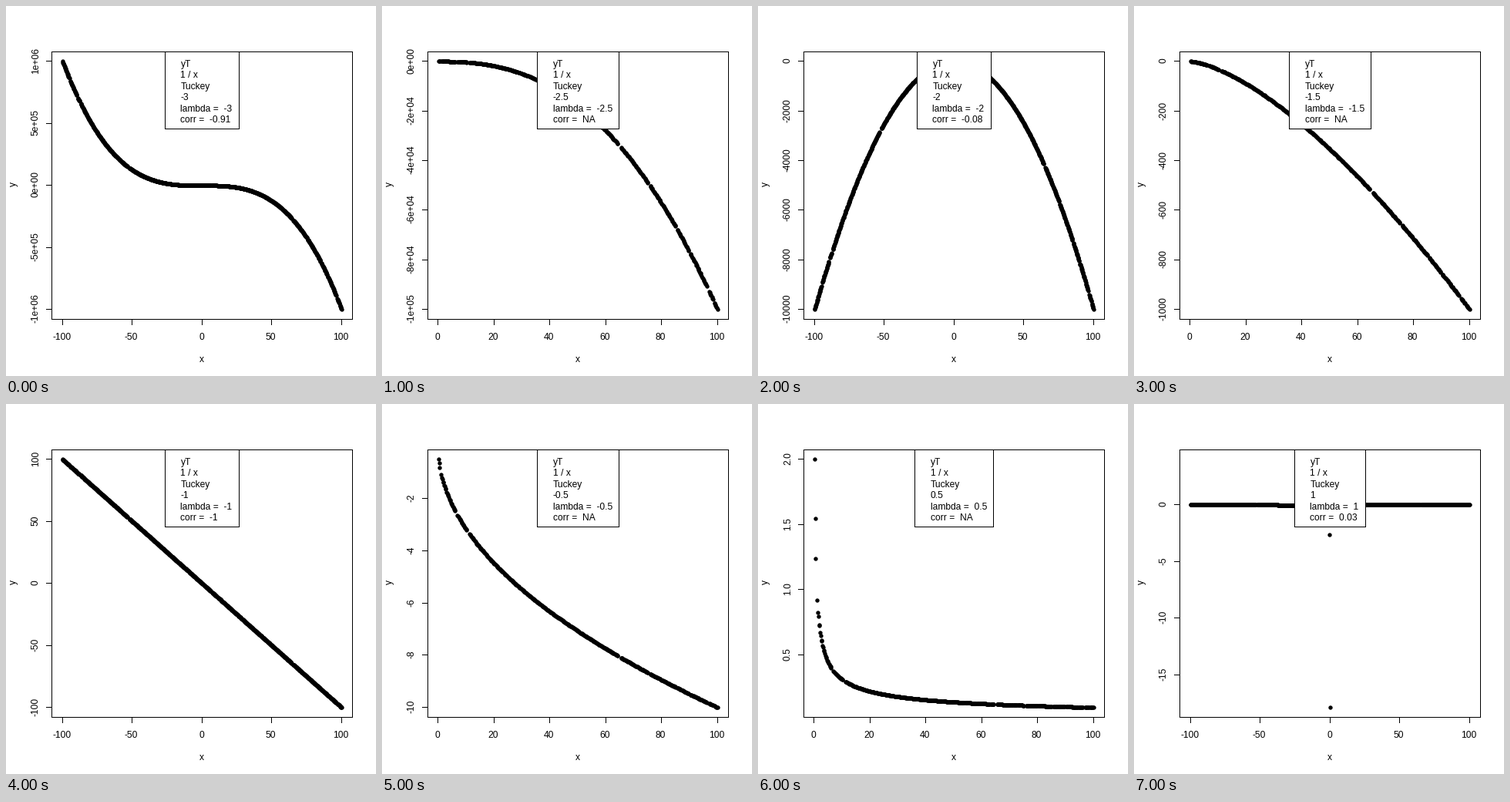
A matplotlib script for the animation above (8 s loop, 480 px wide and 480 px high).

```python
import math

import matplotlib.pyplot as plt
import numpy as np
from matplotlib.animation import FuncAnimation
from matplotlib.markers import MarkerStyle
from matplotlib.patches import Rectangle
from matplotlib.transforms import Affine2D

SIZE, DPI = 480, 80
PX = 72 / DPI                      # points per pixel
LEFT, RIGHT, TOP, BOTTOM = 59.04, 449.76, 59.04, 406.56
MID_X, MID_Y = 254, 232
DOT = 5.4

# power, y tick step, y tick format, correlation, legend width
STEPS = [
    (-3, 5e5, ".0e", "-0.91", 96),
    (-2.5, 2e4, ".0e", "NA", 106),
    (-2, 2000, ".0f", "-0.08", 96),
    (-1.5, 200, ".0f", "NA", 106),
    (-1, 50, ".0f", "-1", 96),
    (-0.5, 2, ".0f", "NA", 106),
    (0.5, 0.5, ".1f", "NA", 102),
    (1, 5, ".0f", "0.03", 92),
]

POS_GAPS = [(6.15, 7), (10.3, 11.25), (64.3, 65.5), (75.1, 75.95),
            (84.9, 85.65), (89.7, 90.4), (96.1, 97.05), (98.3, 98.95)]
NEG_GAPS = [(52, 53.4), (87, 87.9), (89, 89.9), (94.3, 95.2)]


def sample(rng, nearest, start, gaps):
    """Random magnitudes up to 100 with a few empty stretches."""
    x = np.arange(start, 99.9, 0.2)
    x[1:] += rng.uniform(-0.1, 0.1, len(x) - 1)
    for lo, hi in gaps:
        x = x[(x <= lo) | (x >= hi)]
    return np.concatenate([nearest, x, np.ravel(gaps), [100]])


rng = np.random.default_rng(4)
POS = sample(rng, [0.251, 0.42, 0.65], 1.18, POS_GAPS)
NEG = -sample(rng, [0.056, 0.38], 0.62, NEG_GAPS)

# Markers sit on pixel corners; move them to pixel centres.
CENTRED = MarkerStyle(
    "o", transform=Affine2D().translate(0.5 / DOT, -0.5 / DOT))

plt.rcParams["font.family"] = "Liberation Sans"
fig = plt.figure(figsize=(SIZE / DPI, SIZE / DPI), dpi=DPI, facecolor="white")
ax = fig.add_axes([0, 0, 1, 1])


def limits(v):
    pad = 0.04 * (v.max() - v.min())
    return v.min() - pad, v.max() + pad


def ticks(lim, step):
    first, last = math.ceil(lim[0] / step), math.floor(lim[1] / step)
    return [k * step for k in range(first, last + 1)]


# Whole coordinates snap to the pixel with that index.
def line(x0, y0, x1, y1):
    ax.plot([x0, x1], [y0, y1], color="black", lw=PX, antialiased=False,
            solid_capstyle="butt")


def box(x0, y0, x1, y1, fill, z):
    ax.add_patch(Rectangle((x0, y0), x1 - x0, y1 - y0, fc=fill, ec="black",
                           lw=PX, antialiased=False, zorder=z))


def label(x, y, text, ha="center", angle=0):
    ax.text(x, y, text, ha=ha, va="baseline", rotation=angle,
            rotation_mode="anchor", fontsize=12 * PX, color="black", zorder=6)


def draw(i):
    power, step, fmt, corr, width = STEPS[i]
    whole = power == int(power)
    x = np.concatenate([NEG, POS]) if whole else POS
    y = math.copysign(1, power) * x ** -power
    xlim, ylim = limits(x), limits(y)

    def to_x(v):
        share = (v - xlim[0]) / (xlim[1] - xlim[0])
        return np.floor(LEFT + share * (RIGHT - LEFT))

    def to_y(v):
        share = (v - ylim[0]) / (ylim[1] - ylim[0])
        return np.floor(BOTTOM - share * (BOTTOM - TOP))

    ax.clear()
    ax.axis("off")
    ax.set_xlim(0, SIZE)
    ax.set_ylim(SIZE, 0)

    ax.plot(to_x(x), to_y(y), ls="none", marker=CENTRED, ms=DOT * PX, mew=0,
            color="black", antialiased=False, zorder=3)
    box(59, 59, 449, 406, "none", 4)

    for t in ticks(xlim, 50 if whole else 20):
        px = to_x(t)
        line(px, 406, px, 413)
        label(px - 0.5, 433, f"{t}")
    for t in ticks(ylim, step):
        py = to_y(t)
        line(52, py, 59, py)
        label(42, py - 0.5, format(t, fmt), angle=90)
    label(MID_X - 0.5, 462, "x")
    label(13, MID_Y - 0.5, "y", angle=90)

    x0 = MID_X - width // 2
    box(x0, 59, x0 + width, 159, "white", 5)
    rows = ["yT", "1 / x", "Tuckey", f"{power}", f"lambda =  {power}",
            f"corr =  {corr}"]
    for k, row in enumerate(rows):
        label(x0 + 20.5, round(79 + 14.4 * k), row, ha="left")


anim = FuncAnimation(fig, draw, frames=len(STEPS), init_func=lambda: None,
                     interval=1000, repeat=True, repeat_delay=0)
plt.show()
```
